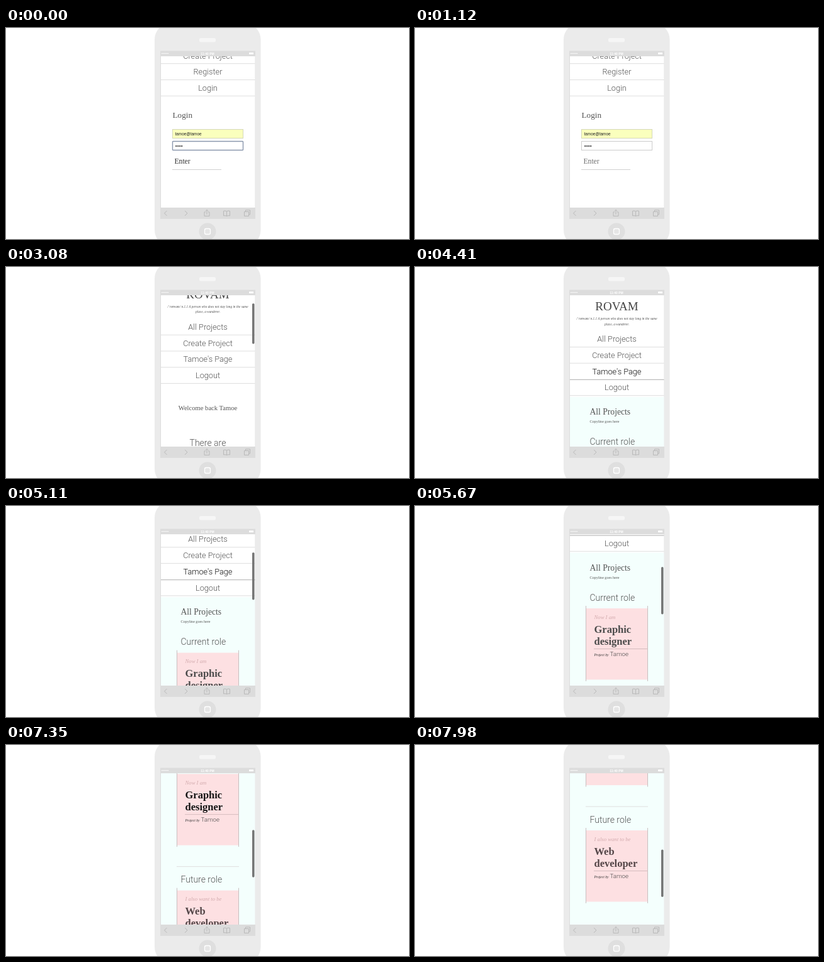
These frames come from a looping animation (640x336 px, 8000 ms). An HTML page:

```html
<!DOCTYPE html>
<html lang="en">
<head>
<meta charset="utf-8">
<title>Phone walkthrough</title>
<style>
  html, body { margin: 0; width: 100%; height: 100%; overflow: hidden; background: #fff; }
  svg { display: block; width: 640px; height: 336px; }
  text { font-family: "Liberation Serif", "Times New Roman", serif; fill: #555; }
  .sans { font-family: Roboto, sans-serif; font-weight: 300; }
  .mid { text-anchor: middle; }
  .menu text { font-size: 12.7px; }
  .big { font-size: 14px; }
  .rule { stroke: #dedede; stroke-width: 1; }
  .title { font-size: 13.6px; }
  .lead { font-size: 8.7px; font-style: italic; fill: #d3abae; }
  .role { font-size: 16.5px; font-weight: bold; }
  .by { font-size: 5.6px; font-style: italic; fill: #333; }
  .icons { fill: none; stroke: #b9b9b9; stroke-width: 1; }
</style>
</head>
<body>
<svg viewBox="0 0 640 336">
  <defs>
    <clipPath id="view"><rect x="246" y="45" width="149.5" height="241"/></clipPath>
    <g id="card">
      <rect x="271.5" y="295.5" width="98" height="113.5" fill="#fde0e2"/>
      <path d="M271.5 291.5v120M369.5 291.5v120" stroke="#c9bfc0"/>
      <path d="M284 360h86" stroke="#d5bcbe"/>
      <text class="by" x="284.5" y="371.5">Project by</text>
      <text class="sans" x="309.5" y="371.5" font-size="9.7" style="fill:#444">Tamoe</text>
    </g>
  </defs>

  <!-- phone -->
  <rect x="236" y="-7" width="168.5" height="354" rx="25" fill="#ebebeb"/>
  <rect x="307" y="16" width="26" height="6.5" rx="2.5" fill="#f6f6f6"/>
  <circle cx="320" cy="324" r="13.5" fill="#dfdfdf"/>
  <rect x="315.5" y="319.5" width="9" height="9" rx="2.2" fill="#e6e6e6" stroke="#fff" stroke-width="1.3"/>
  <rect x="245" y="36.5" width="151" height="267.5" fill="#dcdcdc"/>
  <rect x="246" y="45" width="149.5" height="241" fill="#fff"/>

  <g clip-path="url(#view)">
    <g id="page">
      <g id="projects">
        <rect x="246" y="207" width="149.5" height="500" fill="#f4fffd"/>
        <text class="title" x="277.5" y="235">All Projects</text>
        <text x="277.5" y="248" font-size="6.1">Copyline goes here</text>
        <text class="sans big" x="277.5" y="283">Current role</text>
        <use href="#card"/>
        <text class="lead" x="284.5" y="312">Now I am</text>
        <g id="job">
          <text class="role" x="284.5" y="334" style="fill:inherit">Graphic</text>
          <text class="role" x="284.5" y="353" style="fill:inherit">designer</text>
        </g>
        <path class="rule" d="M271 443h99"/>
        <text class="sans big" x="277.5" y="468.5">Future role</text>
        <use href="#card" y="185.5"/>
        <text class="lead" x="284.5" y="497.5">I also want to be</text>
        <text class="role" x="284.5" y="519.5" style="fill:#544648">Web</text>
        <text class="role" x="284.5" y="538.5" style="fill:#544648">developer</text>
      </g>

      <g id="welcome" class="mid">
        <text x="320.5" y="247" font-size="10.6">Welcome back Tamoe</text>
        <g class="big">
          <text class="sans" x="320.5" y="304">There are</text>
          <text class="sans" x="320.5" y="325">about 5 billion</text>
          <text class="sans" x="320.5" y="346">jobs in the</text>
          <text class="sans" x="320.5" y="367">world.</text>
        </g>
      </g>

      <g class="menu mid">
        <text x="320.5" y="69" style="font-size:19px;fill:#444">ROVAM</text>
        <g font-style="italic">
          <text x="320.5" y="84" style="font-size:5.3px">/ˈrəʊvam/ n.1.1 A person who does not stay long in the same</text>
          <text x="320.5" y="92.7" style="font-size:5.3px">place, a wanderer.</text>
        </g>
        <path class="rule" d="M246 127.5h150M246 153.2h150M246 179h150M246 204.7h150"/>
        <path id="mark" d="M246 179.5h150" stroke="#bbb"/>
        <text class="sans" x="320.5" y="119.2">All Projects</text>
        <text class="sans" x="320.5" y="145">Create Project</text>
        <g id="guest">
          <text class="sans" x="320.5" y="170.8">Register</text>
          <text class="sans" x="320.5" y="196.4">Login</text>
        </g>
        <g id="member">
          <text class="sans" id="own" x="320.5" y="170.8">Tamoe's Page</text>
          <text class="sans" x="320.5" y="196.4">Logout</text>
        </g>
      </g>

      <g id="form" transform="translate(0 96.5)">
        <text x="264.5" y="143" font-size="13.2">Login</text>
        <rect x="264.5" y="161.5" width="112" height="14" fill="#faffbd" stroke="#d6d8b8"/>
        <text x="268.5" y="170.8" font-size="6.4" style="font-family:'Liberation Sans',Arial,sans-serif;fill:#222">tamoe@tamoe</text>
        <rect x="264.5" y="180.5" width="112" height="14" fill="#fff" stroke="#ccc"/>
        <rect id="ring" x="264.5" y="180.5" width="112" height="14" rx="1" fill="none" stroke="#8a97ad" stroke-width="1.4"/>
        <path d="M270.2 188h9.5" stroke="#222" stroke-width="2.2" stroke-linecap="round" stroke-dasharray="0 3"/>
        <path id="caret" d="M280.5 184v8" stroke="#444" stroke-width=".8"/>
        <text id="enter" x="267.5" y="216" font-size="11.6" style="fill:#333">Enter</text>
        <path d="M264 225.5h78" stroke="#d0d0d0"/>
      </g>
    </g>
    <rect id="bar" x="391" width="3.5" rx="1.7" fill="#747474"/>
  </g>

  <!-- status bar -->
  <path d="M247.5 40.6h11" stroke="#fff" stroke-width="1.5" stroke-linecap="round" stroke-dasharray="0 2"/>
  <text class="mid" x="320" y="42.6" font-size="5" font-weight="bold" style="font-family:'Liberation Sans',Arial,sans-serif;fill:#fff">11:40 PM</text>
  <rect x="386" y="39" width="7" height="3" rx=".6" fill="#fff"/>

  <!-- browser toolbar -->
  <g class="icons">
    <path d="M255.5 291l-4 4 4 4M284 291l4 4-4 4"/>
    <path d="M317 293h-2v6.5h8V293h-2M319 297v-7.5M317 291.5l2-2 2 2"/>
    <path d="M350.5 292v7.5M350.5 292q-2.5-1.6-5-.5v7.5q2.500-.8 5 .5q2.500-1.300 5-.5v-7.500q-2.500-1.100-5 .5"/>
    <path d="M378.500 292.500h7v7h-7zM380.500 292.500v-2.500h7v7h-2"/>
  </g>
</svg>
<script>
  const LOOP = 8000, STEP = 70;
  const el = id => document.getElementById(id);
  const [page, projects, welcome, guest, member, form, ring, caret, enter, mark, own, job, bar] =
    ["page", "projects", "welcome", "guest", "member", "form", "ring", "caret", "enter", "mark", "own", "job", "bar"].map(el);

  // Progress that advances by 1/steps on every tick, starting at the tick `from`.
  const ramp = (t, from, steps) => Math.min(1, Math.max(0, ((t - from) / STEP + 1) / steps));
  const grey = (a, b, p) => { const v = Math.round(a + (b - a) * p); return `rgb(${v},${v},${v})`; };
  const fade = (node, p) => node.setAttribute("opacity", p);

  function draw(time) {
    const t = Math.floor(time / STEP) * STEP;
    const signedIn = ramp(t, 1400, 3);
    const listed = ramp(t, 4270, 3);
    const hover = ramp(t, 3640, 3);

    const scroll = 96.5 * (1 - ramp(t, 2310, 15))
      + 132.5 * ramp(t, 4690, 15)
      + 212.5 * ramp(t, 6650, 20);
    page.setAttribute("transform", `translate(0 ${-scroll})`);

    fade(guest, 1 - signedIn);
    fade(form, 1 - signedIn);
    fade(member, signedIn);
    fade(welcome, signedIn * (1 - listed));
    fade(projects, listed);

    const pressed = ramp(t, 1050, 2);
    fade(ring, 1 - pressed);
    fade(enter, 1 - 0.3 * pressed);
    fade(caret, t >= 350 && t < 910 ? 1 : 0);

    own.style.fill = grey(85, 15, hover);
    fade(mark, hover);
    job.style.fill = grey(76, 22, ramp(t, 5810, 12));

    const late = t >= 4270;
    bar.setAttribute("y", late ? 53.7 + scroll * 0.327 : 52.5 + scroll * 0.28);
    bar.setAttribute("height", late ? 75.5 : 64.5);
    let shown = 0;
    if (t >= 6650) shown = 1;
    else if (t >= 4690) shown = 1 - ramp(t, 5810, 3);
    else if (t >= 2310) shown = 1 - ramp(t, 3920, 3);
    fade(bar, shown);
  }

  function loop() {
    draw(performance.now() % LOOP);
    requestAnimationFrame(loop);
  }
  loop();
</script>
</body>
</html>
```
